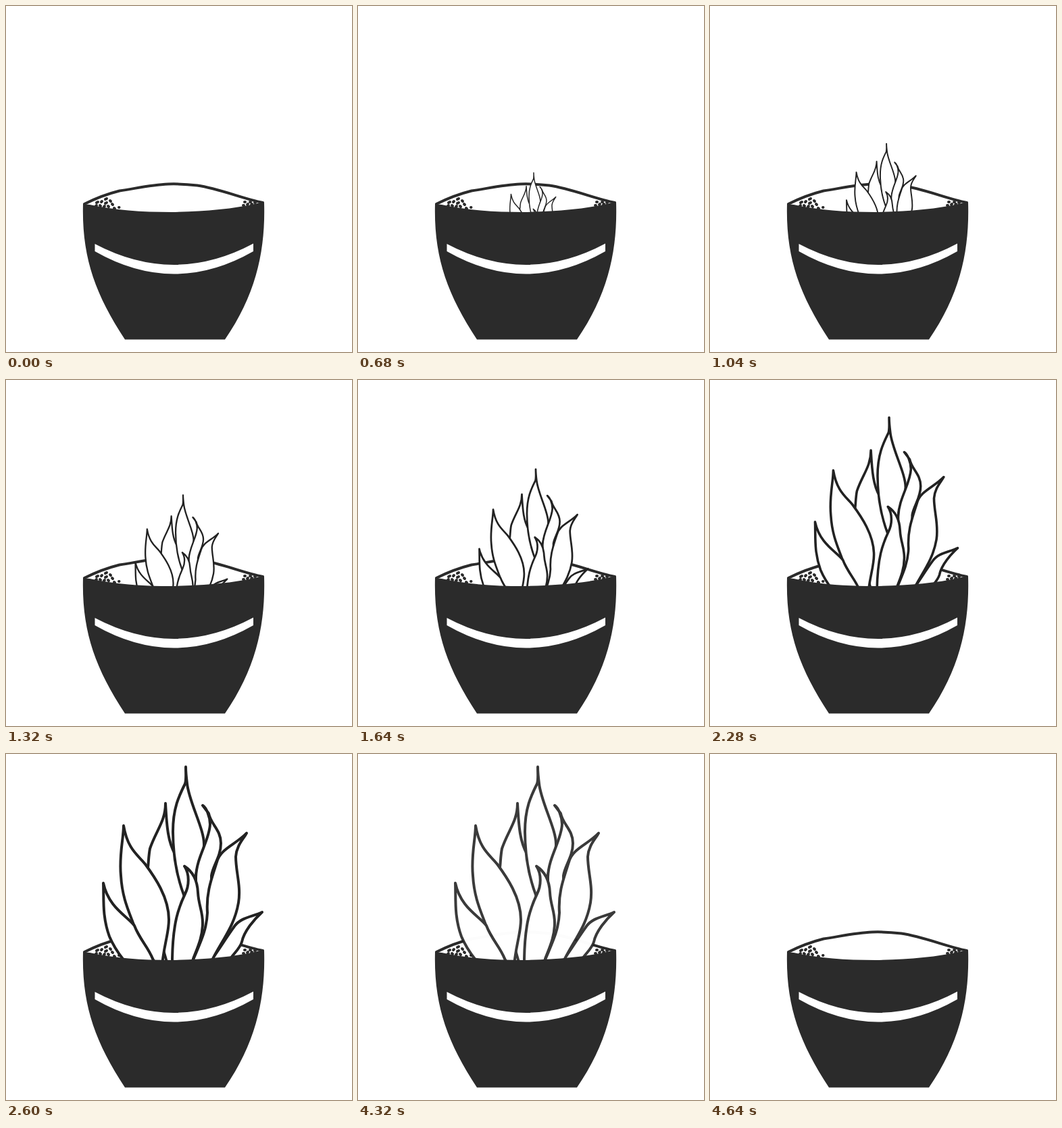
An HTML page that plays this animation: 512 px wide and 512 px high, repeating every 4720 ms.

```html
<!DOCTYPE html>
<html lang="en">
<head>
<meta charset="utf-8">
<title>Growing plant</title>
<style>
  html, body { margin: 0; width: 100%; height: 100%; overflow: hidden; background: #fff; }
  svg { display: block; width: 100%; height: 100%; }
  .line { fill: none; stroke: #2b2b2b; stroke-width: 4; stroke-linecap: round; stroke-linejoin: round; }
  #leaves { fill: #fff; stroke-width: 4; stroke-linecap: round; stroke-linejoin: round; }
</style>
</head>
<body>
<svg viewBox="0 0 512 512">
  <!-- back rim and soil -->
  <path class="line" d="M116 293C132 285 150 278 168 273.500C192 270 215 264.500 240 263.500C255 263 270 264 283 265.500C315 270 350 285 380 291"/>
  <path class="line" d="M134 291l2-1M141 290l1-1M147 286l2-1M154 288l1 1M147 292l2-1M157 293l1 1M133 296l1-1M139 295l1 1M145 297l1-1M151 296l1 1M160 299l1 1M167 298l.5 0"/>
  <path class="line" d="M353 290l1 0M351 295l1 0M357 294l1-1M361 290l1 0M363 294l1-1M368 291l1 0"/>

  <g id="plant">
    <!-- a white backing keeps the rim hidden longer while the plant fades -->
    <use id="backing" href="#leaves" stroke="none"/>
    <use id="drawing" href="#leaves" stroke="#222"/>
  </g>

  <defs>
    <g id="leaves">
      <path d="M236 73C236 100 222 113 213 140C211 150 211 160 210 168C215 230 231 285 238 308L258 320C256 270 262 240 266 210C262 190 262 170 250 148C240 130 238 110 236 73Z"/>
      <path d="M266 19C266 30 267 38 265 44C256 62 247 80 247 115C247 150 254 185 264 211L272 218L281 180C284 160 293 150 293 135C294 112 271 72 268 44C267 36 266 27 266 19Z"/>
      <path d="M291 76C296 79 302 92 302 104C301 128 282 152 281 182L281 262L290 280L305 250L304 180C306 165 318 152 318 132C318 112 303 104 300 88Z"/>
      <path d="M174 106C174 125 167 150 170 180C172 215 183 235 191 258L217 303L230 325C232 285 241 268 241 245C241 212 220 182 206 163C196 150 180 142 174 106Z"/>
      <path d="M144 191C145 215 142 240 153 270C160 287 168 297 175 306L190 325L226 325L217 303C210 285 198 275 190 254C180 240 152 228 144 191Z"/>
      <path d="M379 234C368 244 352 262 349 278C346 288 338 294 332 303L320 325L300 325L306 302C318 285 327 270 338 255C347 242 364 241 379 234Z"/>
      <path d="M264 166C272 178 271 195 265 207C255 228 247 250 246 303L246 325L270 325L277 303C284 285 291 270 291 250C291 232 285 224 284 205C283 184 275 173 264 166Z"/>
      <path d="M356 117C352 125 341 135 340 152C340 175 348 195 344 220C338 255 320 275 305 305L300 325L270 325L278 302C288 278 297 260 298 235C296 205 304 185 312 160C317 140 340 134 356 117Z"/>
    </g>
  </defs>

  <!-- pot front -->
  <path fill="#2b2b2b" d="M114 293L124 294C160 302 200 305 245 305C290 304 335 301 372 292L382 291C384 360 371 425 324 493.500L176 493.500C131 425 112 370 114 293Z"/>
  <path fill="#fff" d="M131.500 352Q249 414 366 351.500V363Q249 430 131.500 363Z"/>
</svg>
<script>
  const LOOP = 4720, TICK = 40;
  const GROW_START = 200, FADE_START = 4280, FADE_TIME = 360;
  const ROOT = { x: 256.5, y: 377.5 };
  const plant = document.getElementById('plant');
  const layers = plant.querySelectorAll('use');
  const clamp = (v, lo, hi) => Math.min(hi, Math.max(lo, v));

  function draw(time) {
    const t = Math.floor((time % LOOP) / TICK) * TICK;
    const scale = clamp(0.2 + (t - 186) / 3000, 0.2, 1);
    const opacity = t < GROW_START ? 0 : clamp(1 - (t - FADE_START) / FADE_TIME, 0, 1);
    plant.setAttribute('transform',
      `translate(${ROOT.x} ${ROOT.y}) scale(${scale}) translate(${-ROOT.x} ${-ROOT.y})`);
    for (const layer of layers) layer.setAttribute('opacity', opacity);
  }

  const start = performance.now();
  function frame() {
    draw(performance.now() - start);
    requestAnimationFrame(frame);
  }
  frame();
</script>
</body>
</html>
```
